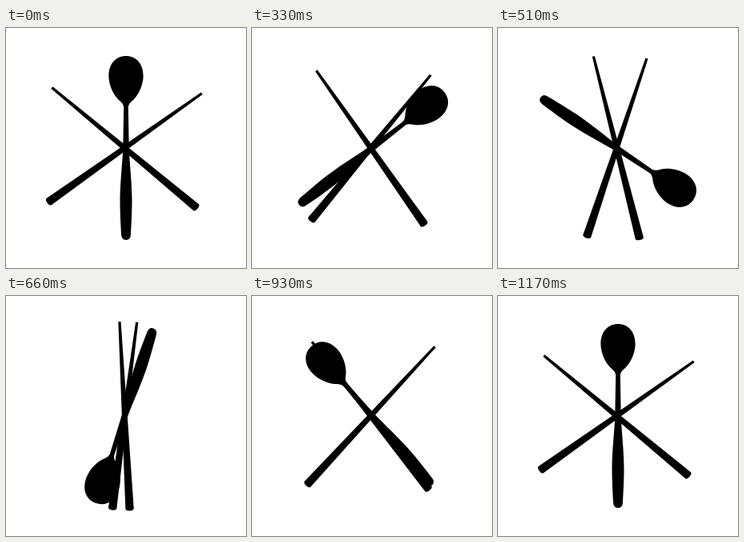
These frames come from a looping animation (300x300 px, 1.2 s). An HTML page:

```html
<!DOCTYPE html>
<html lang="en">
<head>
<meta charset="utf-8">
<title>Spoon and chopsticks</title>
<style>
  html, body { margin: 0; width: 100%; height: 100%; overflow: hidden; background: #fff; }
  svg { display: block; width: 100vw; height: 100vh; }
</style>
</head>
<body>
<svg viewBox="0 0 300 300">
  <defs>
    <path id="stick" d="M-1.6 -118.2H1.6L5.2 116.2Q4.6 118.6 0 118.6T-5.2 116.2Z"/>
  </defs>
  <use id="left" href="#stick"/>
  <use id="right" href="#stick"/>
  <g id="spoon">
    <path transform="translate(.8 0)" d="M0 -115
      C13 -115 21.6 -105 21.6 -90 C21.6 -79 16 -67 9.5 -60.5
      C5.5 -57 3.2 -55 2.8 -51 L3.7 0
      C4.5 20 7.3 42 7.5 65 C7.5 82 6.6 96 6 108 Q5.6 115 0 115
      Q-5.6 115 -6 108 C-6.6 96 -7.5 82 -7.5 65 C-7.3 42 -4.5 20 -3.7 0
      L-2.8 -51 C-3.2 -55 -5.5 -57 -9.5 -60.5
      C-16 -67 -21.6 -79 -21.6 -90 C-21.6 -105 -13 -115 0 -115Z"/>
  </g>
</svg>
<script>
const LOOP = 1200, STEP = 30, TURN = LOOP - STEP;
const OPEN_LEFT = -50.3, OPEN_RIGHT = 54.7, SWING = OPEN_RIGHT - OPEN_LEFT;
const [left, right, spoon] = ['left', 'right', 'spoon'].map(id => document.getElementById(id));

// Cubic Bezier easing with handles (.44, 0) and (.65, 1), solved by bisection.
function ease(x) {
  let lo = 0, hi = 1, u = x;
  for (let i = 0; i < 30; i++) {
    u = (lo + hi) / 2;
    const v = 1 - u;
    const at = 3 * 0.44 * u * v * v + 3 * 0.65 * u * u * v + u * u * u;
    if (at < x) lo = u; else hi = u;
  }
  return u * u * (3 - 2 * u);
}

function place(el, x, angle) {
  el.setAttribute('transform', `translate(${x} 150) rotate(${angle})`);
}

function draw(ms) {
  const t = Math.floor((ms % LOOP) / STEP) * STEP;
  const e = t === 0 ? 0 : t >= TURN ? 1 : ease(t / TURN);
  place(left, 148.3, OPEN_LEFT + SWING * e);
  place(right, 148.3, OPEN_RIGHT - SWING * e);
  place(spoon, 149.2, 360 * e);
}

let start;
function tick(now) {
  start ??= now;
  draw(now - start);
  requestAnimationFrame(tick);
}
draw(0);
requestAnimationFrame(tick);
</script>
</body>
</html>
```
